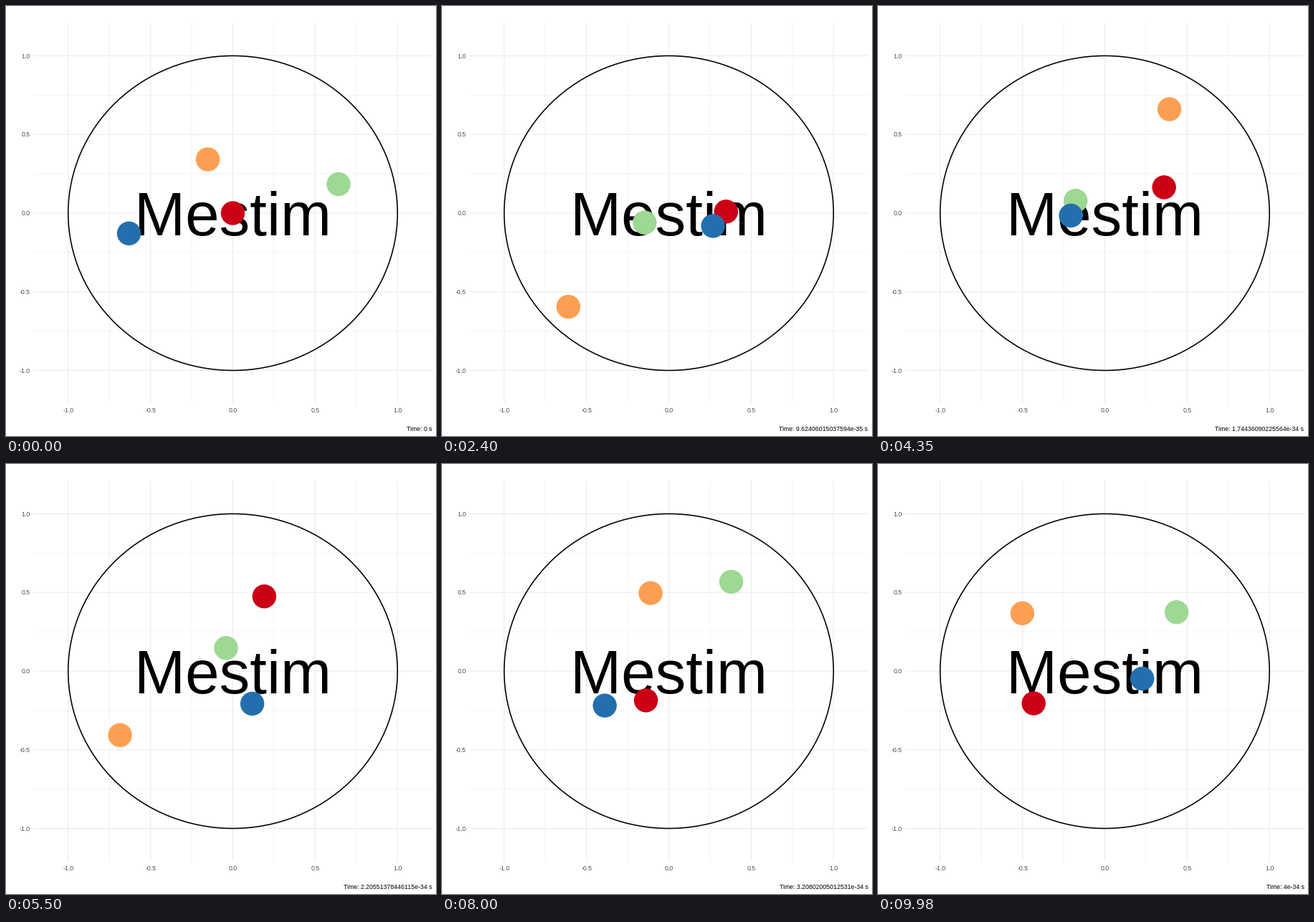
A matplotlib script that plays this animation: 600x600 px, repeating every 10 s.

```python
import numpy as np
import matplotlib.pyplot as plt
from matplotlib.animation import FuncAnimation
from matplotlib.patches import Circle, Ellipse

SIZE, DPI = 600, 72
FRAMES, INTERVAL = 400, 25
T_END = 4e-34
LEFT, RIGHT, TOP, BOTTOM = 38.5, 594.5, 23.4, 554.6
SPAN = 2.42
CX, CY = (LEFT + RIGHT) / 2, (TOP + BOTTOM) / 2
RX, RY = (RIGHT - LEFT) / SPAN, (BOTTOM - TOP) / SPAN
DOT_R = 16.7

plt.rcParams["font.family"] = "Liberation Sans"

# Shared key times in seconds; poses are complex positions in the unit disc
KEY_TIMES = np.array([0, 1.6, 3.2, 5.5, 7.05, 8, 9.98])
RED = [0, .18 + .205j, .479 - .173j, .191 + .475j, .25, -.139 - .186j,
       -.433 - .205j]
ORANGE = [-.152 + .342j, -.866 - .207j, -.02 - .75j, -.685 - .407j,
          .216 - .678j, -.111 + .496j, -.502 + .367j]
GREEN = [.642 + .184j, .094 - .008j, -.309 - .074j, -.041 + .147j,
         -.402 - .298j, .379 + .568j, .436 + .374j]
BLUE = [-.631 - .129j, -.019 - .353j, .083 + .226j, .118 - .207j,
        -.08 + .419j, -.389 - .219j, .227 - .046j]


def smooth(values, t):
    """Cubic Hermite curve through values at the key times."""
    h = np.diff(KEY_TIMES)
    slope = np.diff(values) / h
    inner = (h[1:] * slope[:-1] + h[:-1] * slope[1:]) / (h[:-1] + h[1:])
    vel = np.concatenate([slope[:1], inner, slope[-1:]])
    k = np.clip(np.searchsorted(KEY_TIMES, t, side="right") - 1, 0, len(h) - 1)
    u = (t - KEY_TIMES[k]) / h[k]
    return ((1 + 2 * u) * (1 - u) ** 2 * values[k]
            + u * (1 - u) ** 2 * h[k] * vel[k]
            + u ** 2 * (3 - 2 * u) * values[k + 1]
            + u ** 2 * (u - 1) * h[k] * vel[k + 1])


def drift(poses, t):
    """Move freely from pose to pose."""
    return smooth(np.array(poses, complex), t)


def orbit(poses, t):
    """Circle the centre, always counterclockwise."""
    angle = np.angle(poses)
    turns = np.cumsum(np.diff(angle) % (2 * np.pi))
    angle = angle[0] + np.concatenate([[0], turns])
    return smooth(np.abs(poses), t) * np.exp(1j * smooth(angle, t))


BODIES = [("#cb0016", drift, RED), ("#fd9f52", orbit, ORANGE),
          ("#9dd993", drift, GREEN), ("#236fad", orbit, BLUE)]

fig = plt.figure(figsize=(SIZE / DPI, SIZE / DPI), dpi=DPI, facecolor="white")
ax = fig.add_axes([0, 0, 1, 1])
ax.set_xlim(0, SIZE)
ax.set_ylim(SIZE, 0)
ax.axis("off")


def to_px(z):
    return CX + z.real * RX, CY - z.imag * RY


def grid(values, width):
    style = dict(color="#ebebeb", lw=width, solid_capstyle="butt",
                 snap=False, zorder=1)
    for v in values:
        x, y = to_px(complex(v, v))
        ax.plot([x, x], [TOP, BOTTOM], **style)
        ax.plot([LEFT, RIGHT], [y, y], **style)


def label(x, y, text, size=8.8, ha="center", color="black"):
    return ax.text(x, y, text, fontsize=size, ha=ha, va="baseline",
                   color=color, zorder=3)


ticks = np.arange(-1, 1.1, 0.5)
grid(ticks[:-1] + 0.25, 0.53)
grid(ticks, 1.07)
for v in ticks:
    x, y = to_px(complex(v, v))
    label(x, 567, f"{v:.1f}", color="#4d4d4d")
    label(33.5, y + 3.2, f"{v:.1f}", ha="right", color="#4d4d4d")

ax.add_patch(Ellipse((CX, CY), 2 * RX, 2 * RY, fill=False, ec="black",
                     lw=1.6, zorder=2))
label(CX, 319.8, "Mestim", size=85.4)
caption = label(RIGHT, 593, "", ha="right")

times = np.arange(FRAMES) * INTERVAL / 1000
tracks = [move(poses, times) for _, move, poses in BODIES]
dots = [ax.add_patch(Circle((0, 0), DOT_R, fc=color, ec="none", zorder=4))
        for color, _, _ in BODIES]


def update(i):
    for dot, track in zip(dots, tracks):
        dot.center = to_px(track[i])
    caption.set_text(f"Time: {T_END * i / (FRAMES - 1):.15g} s")
    return [*dots, caption]


anim = FuncAnimation(fig, update, frames=FRAMES, interval=INTERVAL,
                     repeat=True, repeat_delay=0, blit=False)
plt.show()
```
